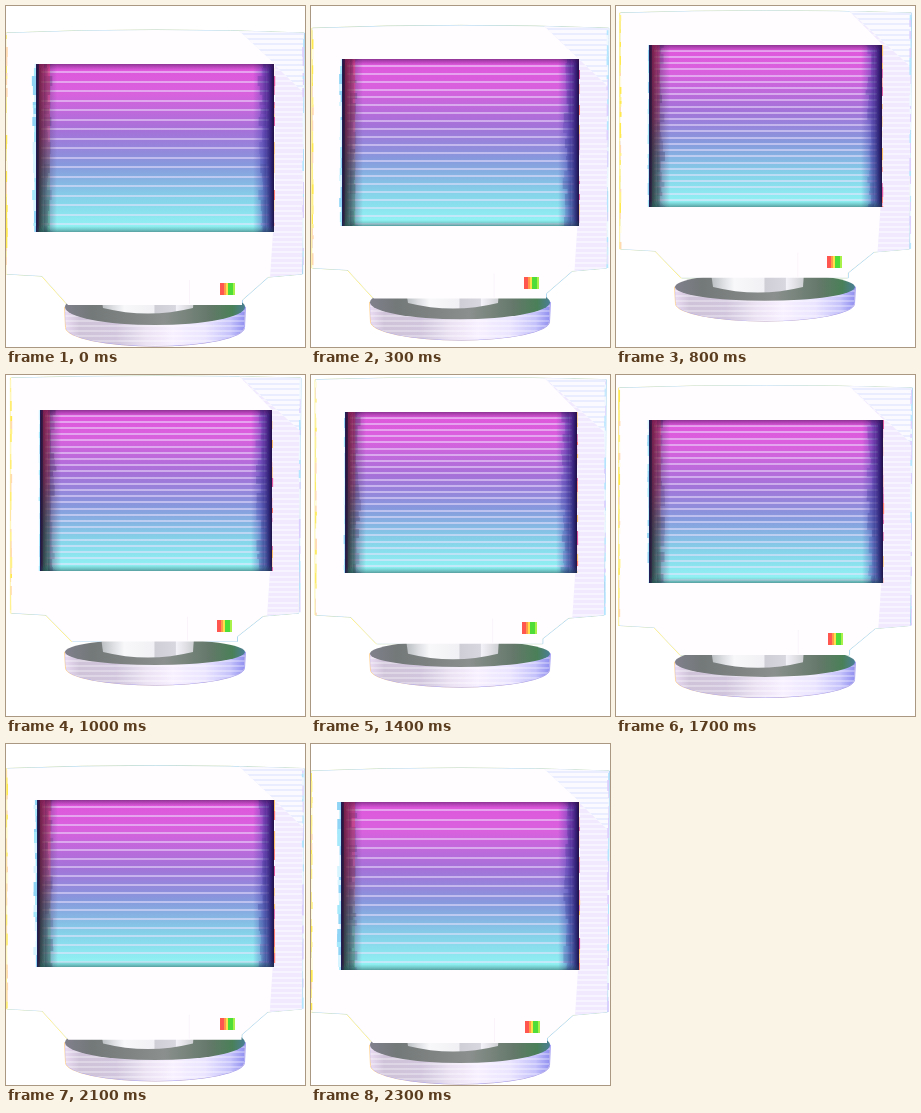
These frames come from a looping animation (299x341 px, 2400 ms). An HTML page with a canvas:

```html
<!DOCTYPE html>
<html lang="en">
<head>
<meta charset="utf-8">
<title>Floating monitor</title>
<style>
html, body { margin: 0; width: 100%; height: 100%; overflow: hidden; background: #fff; }
canvas { display: block; width: 299px; height: 341px; }
</style>
</head>
<body>
<canvas id="stage" width="299" height="341"></canvas>
<script>
const W = 299, H = 341, LOOP = 2400, STEP = 100;
const ctx = document.getElementById('stage').getContext('2d');

const noise = n => { const v = Math.sin(n * 127.1 + 3.7) * 43758.5453; return v - Math.floor(v); };

function gradient(x0, y0, x1, y1, colors) {
  const g = ctx.createLinearGradient(x0, y0, x1, y1);
  colors.forEach(([at, color]) => g.addColorStop(at, color));
  return g;
}

function rect(color, x, y, w, h) {
  ctx.fillStyle = color;
  ctx.fillRect(x, y, w, h);
}

function poly(points) {
  const path = new Path2D();
  points.forEach(([x, y], i) => i ? path.lineTo(x, y) : path.moveTo(x, y));
  path.closePath();
  return path;
}

function fill(path, color) {
  ctx.fillStyle = color;
  ctx.fill(path);
}

function outline(path, color, dx, dy) {
  ctx.save();
  ctx.translate(dx, dy);
  ctx.strokeStyle = color;
  ctx.lineWidth = 1;
  ctx.stroke(path);
  ctx.restore();
}

function clipped(path, draw) {
  ctx.save();
  ctx.clip(path);
  draw();
  ctx.restore();
}

function stripes(color, x, w, top, bottom, gap, size) {
  for (let y = top; y < bottom; y += gap) rect(color, x, Math.round(y), w, size);
}

// A vertical fringe whose short runs vary in width and colour.
function ragged(colors, x, top, bottom, width, seed, dir) {
  for (let y = top, i = seed; y < bottom; i++) {
    const h = Math.min(bottom - y, 3 + Math.round(noise(i) * 9));
    const w = width * (0.4 + noise(i + 0.5));
    const color = colors[Math.floor(noise(i + 0.25) * colors.length)];
    rect(color, dir < 0 ? x - w : x, y, w, h);
    y += h;
  }
}

function drawBase(mix) {
  const cy = mix(277, 301), low = mix(293, 321.5);
  const side = new Path2D();
  side.moveTo(59, cy);
  side.lineTo(60, low);
  side.ellipse(149, low, 89, mix(17, 18.5), 0, Math.PI, 0, true);
  side.lineTo(239, cy);
  side.closePath();
  outline(side, '#ffd69a', -0.5, 0);
  outline(side, '#a9a5f5', 0.5, 0);
  fill(side, gradient(59, 0, 239, 0, [
    [0, '#eadcf2'], [0.08, '#cfc3d9'], [0.28, '#d0c5dc'], [0.45, '#ebe2f3'],
    [0.6, '#f7f0ff'], [0.78, '#eae4ff'], [0.92, '#c4c1fb'], [1, '#908ff0']]));
  clipped(side, () => stripes('rgba(255,255,255,.3)', 55, 190, cy + 3, low + 20, 5, 2));

  const top = new Path2D();
  top.ellipse(149, cy, 90, mix(13, 18), 0, 0, Math.PI * 2);
  fill(top, gradient(59, 0, 239, 0, [
    [0, '#80808c'], [0.15, '#737878'], [0.55, '#8b908e'], [0.8, '#64786a'],
    [0.93, '#4a8058'], [1, '#4a7f96']]));

  const neckTop = mix(262, 290), neckLow = mix(277, 302);
  const neck = new Path2D();
  neck.moveTo(95, neckTop);
  neck.lineTo(97, neckLow);
  neck.quadraticCurveTo(142, neckLow + 11, 187, neckLow);
  neck.lineTo(188, neckTop);
  neck.closePath();
  fill(neck, gradient(95, 0, 188, 0, [
    [0, '#b9bdc0'], [0.13, '#dcdee2'], [0.25, '#f8f8fa'], [0.57, '#f1f0f4'],
    [0.58, '#cfced6'], [0.8, '#d8d6df'], [0.81, '#f4f2f9'], [1, '#cdcfd2']]));
}

function caseShape(mix) {
  const left = mix(5, 0.5), right = mix(294.5, 298), top = mix(3, 27);
  const hip = mix(239, 269), low = mix(266.5, 299);
  const chinL = mix(66, 62), chinR = mix(231, 236);
  const path = new Path2D();
  path.moveTo(left, top);
  path.quadraticCurveTo(150, top - mix(4, 6), right, top);
  path.lineTo(right - 2, hip - 1);
  path.lineTo(mix(257, 262), hip + 2);
  path.lineTo(chinR, low - 5);
  path.lineTo(chinR, low);
  path.lineTo(chinL, low);
  path.lineTo(mix(40, 36), hip + 1);
  path.lineTo(left, hip - 1);
  path.closePath();
  return { path, left, right, top, hip, low };
}

function drawCase(mix, { path, left, right, top, hip, low }, frame) {
  fill(path, '#fffdff');
  clipped(path, () => {
    const sx = mix(266, 269), sy = mix(35, 58);
    const shade = poly([[230, top - 5], [sx, sy], [sx, mix(165, 195)],
      [mix(261, 264), hip + 3], [300, hip + 3], [300, top - 5]]);
    fill(shade, '#f1eaff');
    clipped(shade, () => {
      stripes('rgba(255,255,255,.5)', 225, 75, top, hip, 5.2, 2);
      const facet = poly([[230, top - 5], [300, top - 5], [300, top + mix(58, 62)]]);
      fill(facet, '#fbfbff');
      clipped(facet, () => stripes('#e9edff', 225, 75, top, top + 62, 5.2, 2));
    });
    rect('#faf4fa', mix(181, 183), low - 25, 1, 24);
  });
  ragged(['#fff08a', '#fffbe0', '#ffe94e', '#ffd9b0'], left - 0.5, top + 2, hip - 1, 1.3, frame * 31, 1);
  ragged(['#b5e6ff', '#eef8ff', '#dcd0ff'], right, top + 2, hip - 1, 1.3, frame * 37, -1);
}

function drawScreen(mix, k, frame) {
  const x = Math.round(mix(34, 30.5)), y = Math.round(mix(35, 58));
  const r = Math.round(mix(266, 268)), b = Math.round(mix(196, 226));
  const w = r - x, h = b - y, gap = 6.2 + 3.3 * k ** 3;

  ragged(['#a5e8fb', '#d5f4ff', '#8fd4f5'], x, y, b, 1 + 2 * k * k, frame * 13, -1);
  ragged(['#ff7d70', '#ffc06a', '#e05ba0'], r - 1, y, b, 1.6, frame * 19, 1);
  rect(gradient(0, y, 0, b, [
    [0, '#e056dc'], [0.18, '#d861de'], [0.4, '#a472d9'], [0.6, '#8799dd'],
    [0.8, '#85d2e9'], [1, '#93f8f5']]), x, y, w, h);

  ctx.save();
  ctx.beginPath();
  ctx.rect(x, y, w, h);
  ctx.clip();
  stripes('rgba(240,228,255,.52)', x + 5, w - 10, y + gap * 0.75, b - 3, gap, 2);

  rect(gradient(x, 0, x + 21, 0, [
    [0, 'rgba(22,10,35,.95)'], [0.2, 'rgba(50,24,48,.8)'],
    [0.5, 'rgba(80,50,90,.45)'], [0.85, 'rgba(95,70,120,.14)'], [1, 'rgba(90,60,110,0)']]), x, y, 21, h);
  rect(gradient(r - 21, 0, r, 0, [
    [0, 'rgba(70,60,170,0)'], [0.3, 'rgba(65,60,170,.28)'], [0.65, 'rgba(50,42,150,.62)'],
    [0.85, 'rgba(35,25,115,.85)'], [1, 'rgba(24,10,60,.95)']]), r - 21, y, 21, h);
  rect(gradient(0, y, 0, y + 6, [[0, 'rgba(60,20,75,.5)'], [1, 'rgba(90,20,110,0)']]), x, y, w, 6);
  rect(gradient(0, b - 6, 0, b, [[0, 'rgba(40,110,120,0)'], [1, 'rgba(30,70,75,.5)']]), x, b - 6, w, 6);
  rect(gradient(0, y, 0, b, [
    [0, 'rgba(255,45,85,.36)'], [0.45, 'rgba(230,60,70,.25)'],
    [0.75, 'rgba(45,150,70,.2)'], [1, 'rgba(25,170,80,.26)']]), x + 3, y, 7 + 4 * k, h);

  // Dark rounded corners and a broken inner edge.
  ctx.strokeStyle = 'rgba(30,25,70,.07)';
  ctx.lineWidth = 5;
  for (let i = 0; i < 6; i++) {
    ctx.beginPath();
    ctx.roundRect(x + 2 * i - 2, y - 3, w - 4 * i + 4, h + 6, 8 + i);
    ctx.stroke();
  }
  ragged(['rgba(45,30,80,.14)', 'rgba(30,20,60,.2)'], x + 8, y, b, 6, frame * 23, 1);
  ragged(['rgba(45,40,150,.14)', 'rgba(30,30,120,.2)'], r - 8, y, b, 6, frame * 29, -1);
  ctx.restore();
  rect('#211d56', x, y, 1, h);
}

function drawLight(mix) {
  const x = Math.round(mix(211, 214)), y = Math.round(mix(245, 277));
  const bars = [['#ff5650', 4], ['#ff9a48', 2], ['#ffe04a', 2], ['#4fdc38', 5], ['#a8f04a', 2]];
  let at = x;
  for (const [color, width] of bars) {
    rect(color, at, y, width, 12);
    at += width;
  }
}

function draw(frame) {
  const swing = Math.cos(2 * Math.PI * (frame * STEP + 50) / LOOP);
  const k = (swing + 0.924) / 1.915;
  const mix = (high, low) => high + (low - high) * k;
  const shell = caseShape(mix);
  rect('#fff', 0, 0, W, H);
  outline(shell.path, '#fff08a', -0.6, 0);
  outline(shell.path, '#b0d8f2', 0.5, 0);
  drawBase(mix);
  drawCase(mix, shell, frame);
  drawScreen(mix, k, frame);
  drawLight(mix);
}

const start = performance.now();
let shown = -1;
function tick(now) {
  const time = Math.max(0, now - start) % LOOP;
  const frame = Math.floor(time / STEP);
  if (frame !== shown) draw(shown = frame);
  requestAnimationFrame(tick);
}
tick(start);
</script>
</body>
</html>
```
